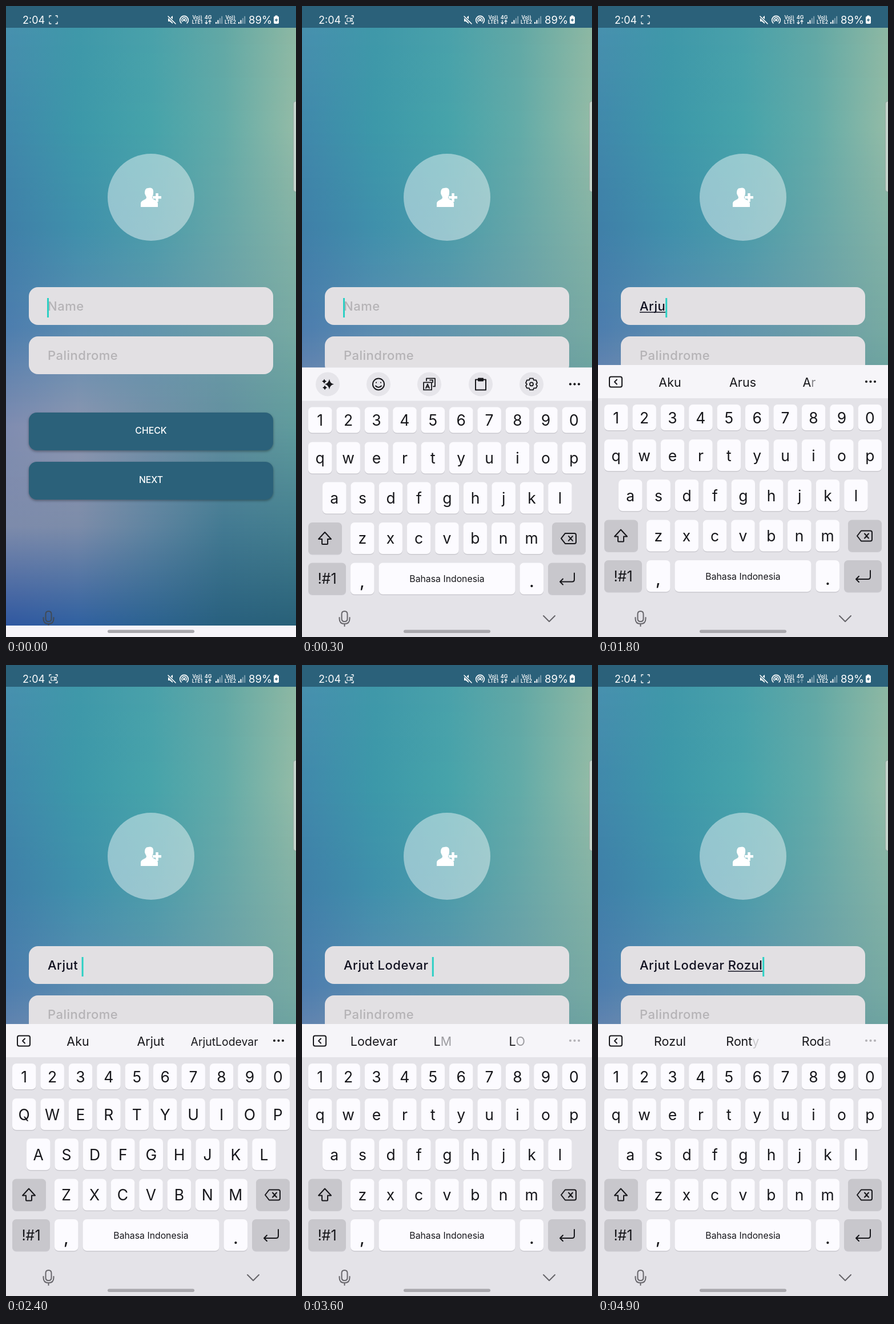
Write an HTML page with a canvas that moves like this. It is 508 px wide and 1102 px high and loops after 5 s.

```html
<!DOCTYPE html>
<html lang="id">
<head>
<meta charset="utf-8">
<style>
  html, body { margin: 0; width: 100%; height: 100%; overflow: hidden; }
  canvas { display: block; width: 508px; height: 1102px; }
</style>
</head>
<body>
<canvas id="stage" width="508" height="1102"></canvas>
<script>
const W = 508, H = 1102, LOOP = 5000, STEP = 100;
const ctx = document.getElementById('stage').getContext('2d');
const INK = '#17171b', BAR = '#2b617a';

// Key presses: time and character; the character is entered one step later.
const presses = [
  [800, 'A'], [1200, 'r'], [1400, 'j'], [1700, 'u'], [2000, 't'], [2200, ' '],
  [2500, 'L'], [2700, 'o'], [2800, 'd'], [3000, 'e'], [3100, 'v'], [3300, 'a'], [3400, 'r'], [3500, ' '],
  [3900, 'R'], [4100, 'o'], [4300, 'z'], [4500, 'u'], [4600, 'l']
];
const suggestions = [
  [950, 'Aku Atas Asap'], [1350, 'Aku Arus Arti'], [1750, 'Aku Arus Arjut'],
  [2050, 'Aku Arjut ArjutLodevar'], [2650, 'Lodevar Luar Lagi'], [3530, 'Lodevar LMK LOL'],
  [3750, 'Rozul Dan Yang'], [4020, 'Rozul Roam Room'], [4760, 'Rozul Ronty Roda']
];

const clamp = (v, lo = 0, hi = 1) => Math.min(hi, Math.max(lo, v));

function box(x, y, w, h, r, fill) {
  ctx.fillStyle = fill;
  ctx.beginPath();
  ctx.roundRect(x, y, w, h, r);
  ctx.fill();
}
function disc(x, y, r, fill) {
  ctx.fillStyle = fill;
  ctx.beginPath();
  ctx.arc(x, y, r, 0, 7);
  ctx.fill();
}
function setFont(size, weight = 400, spacing = 0) {
  ctx.font = `${weight} ${size}px Inter, Roboto, sans-serif`;
  ctx.letterSpacing = spacing + 'px';
}
function text(str, x, y, size, fill = INK, align = 'center', weight = 400, spacing = 0) {
  setFont(size, weight, spacing);
  ctx.textAlign = align;
  ctx.fillStyle = fill;
  ctx.fillText(str, x, y);
}
// SVG path around a local origin, stroked or filled.
function icon(d, x, y, color, width = 2) {
  ctx.save();
  ctx.translate(x, y);
  ctx.lineCap = ctx.lineJoin = 'round';
  ctx.lineWidth = width;
  ctx.strokeStyle = ctx.fillStyle = color;
  const path = new Path2D(d);
  width ? ctx.stroke(path) : ctx.fill(path);
  ctx.restore();
}
function shadow(color, blur, dy) {
  ctx.shadowColor = color;
  ctx.shadowBlur = blur;
  ctx.shadowOffsetY = dy;
}

// Backdrop: colour rows blended down the page.
const rows = [
  '4790ae 3f98a9 49a1aa 62a8a5 8db8a3',
  '4088ab 3c98a9 46a3aa 62aba8 93bba6',
  '3f7fa8 3f90ab 4b9caa 66a6a8 84b2a5',
  '4c7dae 5a8cb0 6195ad 6c9ea8 77aaa2',
  '7f8cb0 8d96b0 7590a7 628f9f 5f9b9c',
  '7d8bab 7c8ca9 5f84a0 437a92 447f8f',
  '2f57a0 2f60a0 2b6290 28607e 286078'
].map(row => row.split(' ').map(c => [0, 2, 4].map(i => parseInt(c.slice(i, i + 2), 16))));

const backdrop = document.createElement('canvas');
backdrop.width = W;
backdrop.height = H;
const back = backdrop.getContext('2d');
for (let y = 38; y < H; y++) {
  const v = clamp((y - 38) / 174, 0, 5.999), i = Math.floor(v), f = v - i;
  const g = back.createLinearGradient(0, 0, W, 0);
  rows[i].forEach((c, k) =>
    g.addColorStop(k / 4, `rgb(${c.map((n, j) => n + (rows[i + 1][k][j] - n) * f)})`));
  back.fillStyle = g;
  back.fillRect(0, y, W, 1);
}

function drawSignal(x) {
  for (let i = 0; i < 4; i++)
    box(x + i * 3.4, 28 - i * 3.4, 2, 3 + i * 3.4, 0, i < 2 ? '#fff' : '#7fa1b1');
}

function drawStatus(t) {
  box(0, 0, W, 38, 0, BAR);
  text('2:04', 29, 31, 18, '#fff', 'left');
  icon('M-7-4V-7H-4M4-7H7V-4M7 4V7H4M-4 7H-7V4', 83, 24, '#fff', 1.3);
  const beat = t % 1000;
  if (beat >= 200 && beat < 800) icon('M-4-3H2V3H-4ZM2-1L5-3V3L2 1', 83, 24, '#fff', 1.2);

  icon('M-6-3H-3L2-7V7L-3 3H-6Z', 290, 24, '#fff', 0);
  icon('M-7-7L7 7', 290, 24, BAR, 4);
  icon('M-6-6L7 7', 290, 24, '#fff', 1.6);
  icon('M-5 6A7.3 7.3 0 1 1 5 6M-3 3A4 4 0 1 1 3 3', 312, 24, '#fff', 1.6);
  disc(312, 24.5, 2, '#fff');
  [335, 393].forEach((x, i) => {
    text('Vo))', x, 23, 8.5, '#fff', 'center', 600);
    text('LTE' + (i + 1), x, 31, 8.5, '#fff', 'center', 600);
    drawSignal(x + 32 - i * 18);
  });
  text('4G', 354, 23, 9, '#fff', 'center', 600);
  icon('M-3-3V3M-5 1L-3 3L-1 1M3 3V-3M1-1L3-3L5-1', 354, 28, t < 4200 ? '#fff' : '#7fa1b1', 1.2);
  text('89%', 425, 31, 18.5, '#fff', 'left');
  box(469, 18, 9, 13, 2, '#fff');
  box(471.5, 16.5, 4, 2, 0, '#fff');
  icon('M1-4L-3 1H0L-1 4L3-1H0Z', 473.5, 24.5, BAR, 0);
}

function drawForm(typed) {
  disc(254, 334, 76, 'rgba(255,255,255,.43)');
  icon('M-5-16C2-18 5-14 4-7C4-3 2-2 2 1C3 5 12 5 12 11V17H-18V11C-18 5-9 5-8 1C-8-2-10-3-11-7C-11-13-9-16-5-16Z', 254, 334, '#fff', 0);
  box(257, 332, 15, 4.5, 0, '#fff');
  box(262.3, 327, 4.5, 15, 0, '#fff');

  box(40, 491, 428, 66, 16, '#e2e0e3');
  box(40, 577, 428, 66, 16, '#e2e0e3');
  const field = [22, '#b5b3b6', 'left', 500, 0.5];
  text('Palindrome', 73, 617.5, ...field);
  if (!typed) text('Name', 73, 532, ...field);
  field[1] = '#10101f';
  text(typed, 73, 532, ...field);
  const end = 73 + ctx.measureText(typed).width;
  const word = typed.split(' ').pop();
  const wide = ctx.measureText(word).width;
  if (word) box(end - wide, 534, wide, 1.5, 0, '#10101f');
  box(end - (typed ? 0 : 1), 510, 3, 34, 0, '#2bd0c4');

  ['CHECK', 'NEXT'].forEach((label, i) => {
    const y = 710 + i * 86;
    shadow('rgba(0,0,0,.35)', 4, 2);
    box(40, y, 428, 66, 14, BAR);
    shadow('transparent', 0, 0);
    text(label, 254, y + 37, 15.8, '#fff', 'center', 500);
  });
}

function drawKey(x, y, w, h, fill = '#fcfbff') {
  box(x, y + 1.5, w, h, 7, '#cbcad0');
  box(x, y, w, h, 7, fill);
}

function drawTools() {
  [45, 134, 223, 313, 402].forEach(x => disc(x, 29, 21, '#e6e5ea'));
  icon('M3-9Q4-1 11 0Q4 1 3 9Q1 1-5 0Q1-1 3-9ZM-6-9Q-5-6-2-5Q-5-4-6-1Q-7-4-10-5Q-7-6-6-9ZM-5 2Q-4 5-1 6Q-4 7-5 10Q-6 7-9 6Q-6 5-5 2Z', 45, 29, INK, 0);
  icon('M-10 0A10 10 0 1 1 10 0A10 10 0 1 1-10 0M-5 3Q0 8 5 3M-4-3V-2.8M4-3V-2.8', 134, 29, INK);
  icon('M-10-3H4V10H-10ZM-6 7L-3 0L0 7M-5 5H-1M-5-6V-10H10V4H7M1-7H6V-3', 223, 29, INK, 1.8);
  icon('M-9-8H9V10H-9ZM-4-10H4V-6H-4Z', 313, 29, INK);
  icon('M-3-10H3L4-7L8-7L10-2L8 0L10 3L8 7L4 7L3 10H-3L-4 7L-8 7L-10 3L-8 0L-10-2L-8-7L-4-7ZM-3 0A3 3 0 1 1 3 0A3 3 0 1 1-3 0', 402, 29, INK, 1.8);
}

// New words appear letter by letter from the left.
function drawWord(word, x, reveal) {
  setFont(21.5);
  const size = 21.5 * Math.min(1, 118 / ctx.measureText(word).width);
  setFont(size);
  const left = x - ctx.measureText(word).width / 2;
  if (reveal >= 1) return text(word, left, 37.5, size, INK, 'left');
  [...word].forEach((ch, i) => {
    ctx.globalAlpha = clamp(reveal * (word.length + 1) - i);
    text(ch, left + ctx.measureText(word.slice(0, i)).width, 37.5, size, INK, 'left');
  });
  ctx.globalAlpha = 1;
}

function drawSuggestions(t) {
  const i = suggestions.findLastIndex(s => s[0] <= t);
  let dots = 1;
  if (i < 0) drawTools();
  else {
    const age = (t - suggestions[i][0]) / 200;
    const old = i ? suggestions[i - 1][1].split(' ') : [];
    suggestions[i][1].split(' ').forEach((word, k) =>
      drawWord(word, [126, 253.5, 382.5][k], word === old[k] ? 1 : age));
    icon('M-8-9H8Q11-9 11-6V6Q11 9 8 9H-8Q-11 9-11 6V-6Q-11-9-8-9ZM2-4L-2 0L2 4', 31, 29.5, INK);
    if (t > 3500 && age < 1) dots = 0.3;
  }
  ctx.globalAlpha = dots;
  [470, 477.5, 485].forEach(x => disc(x, 29, 2.1, INK));
  ctx.globalAlpha = 1;
}

function drawKeyboard(t, top, caps, pressed) {
  ctx.save();
  ctx.translate(0, top);
  box(0, 0, W, H, 0, '#e4e3e8');
  box(0, 0, W, 58, 0, '#f6f5f9');
  drawSuggestions(t);

  let popup;
  [['1234567890', 11, 69, 45], ['qwertyuiop', 11, 130, 55], ['asdfghjkl', 36, 200, 55], ['zxcvbnm', 85, 270.5, 55]]
    .forEach(([letters, x0, y, h]) => [...letters].forEach((ch, i) => {
      const x = x0 + i * 49.4, down = pressed && pressed.toLowerCase() === ch;
      drawKey(x, y, 41.5, h, down ? '#a3a2a7' : undefined);
      const label = caps ? ch.toUpperCase() : ch;
      text(label, x + 20.7, y + h / 2 + 10, 26.5);
      if (down) popup = [label, x + 20.7, y];
    }));

  const grey = '#c8c7cc';
  drawKey(11, 270.5, 59, 55, grey);
  drawKey(438, 270.5, 59, 55, grey);
  drawKey(11, 341, 66, 55, grey);
  drawKey(85, 341, 41.5, 55);
  drawKey(134.5, 341, 239, 55);
  drawKey(381.5, 341, 41.5, 55);
  drawKey(431, 341, 66, 55, grey);
  icon('M0-11L11 1H5V9Q5 10 4 10H-4Q-5 10-5 9V1H-11Z', 40, 298.5, INK);
  icon('M-6-9H10Q13-9 13-6V6Q13 9 10 9H-6L-13 0ZM0-4L7 4M7-4L0 4', 467, 298.5, INK);
  icon('M13-10V1Q13 5 9 5H-12M-7 0L-12 5L-7 10', 464, 369, INK);
  text('!#1', 44, 378, 25);
  text(',', 105.5, 384, 29, INK, 'center', 500);
  text('.', 402.5, 384, 29, INK, 'center', 500);
  text('Bahasa Indonesia', 254, 374.5, 15.8);

  if (popup) {
    const [label, x, y] = popup;
    shadow('rgba(0,0,0,.28)', 8, 2);
    box(x - 38, y - 108, 76, 98.5, 13, '#fcfbff');
    shadow('transparent', 0, 0);
    text(label, x, y - 41, 36);
  }
  ctx.restore();
}

function draw(t) {
  const typed = presses.filter(p => p[0] + STEP <= t).map(p => p[1]).join('');
  const active = presses.find(p => p[0] === t);
  const settled = !presses.some(p => p[0] + STEP === t);
  const caps = typed ? typed.endsWith(' ') && settled : t >= 700;
  const top = 627 + 475 * (1 - clamp(t / 350)) ** 2.4;

  ctx.drawImage(backdrop, 0, 0);
  drawStatus(t);
  drawForm(typed);
  box(503, 166, 9, 159, 5, 'rgba(150,165,160,.8)');
  box(504, 167, 9, 157, 4, '#c5d5cc');

  if (t) drawKeyboard(t, top, caps, active && active[1].trim());
  const foot = t ? '#66656a' : '#414a55';
  icon('M0-13Q5-13 5-8V0Q5 5 0 5Q-5 5-5 0V-8Q-5-13 0-13ZM-9-2V0Q-9 9 0 9Q9 9 9 0V-2M0 9V13', 74.5, 1070, foot);
  if (t) icon('M-10-5L0 5L10-5', 433, 1070, foot);
  else box(0, 1082, W, 20, 0, '#f6f4f9');
  box(178, 1089.5, 152, 5.5, 3, '#a9a8ad');
}

let shown = -1;
function tick(now) {
  const t = Math.floor(now % LOOP / STEP) * STEP;
  if (t !== shown) draw(shown = t);
  requestAnimationFrame(tick);
}
requestAnimationFrame(tick);
</script>
</body>
</html>
```
